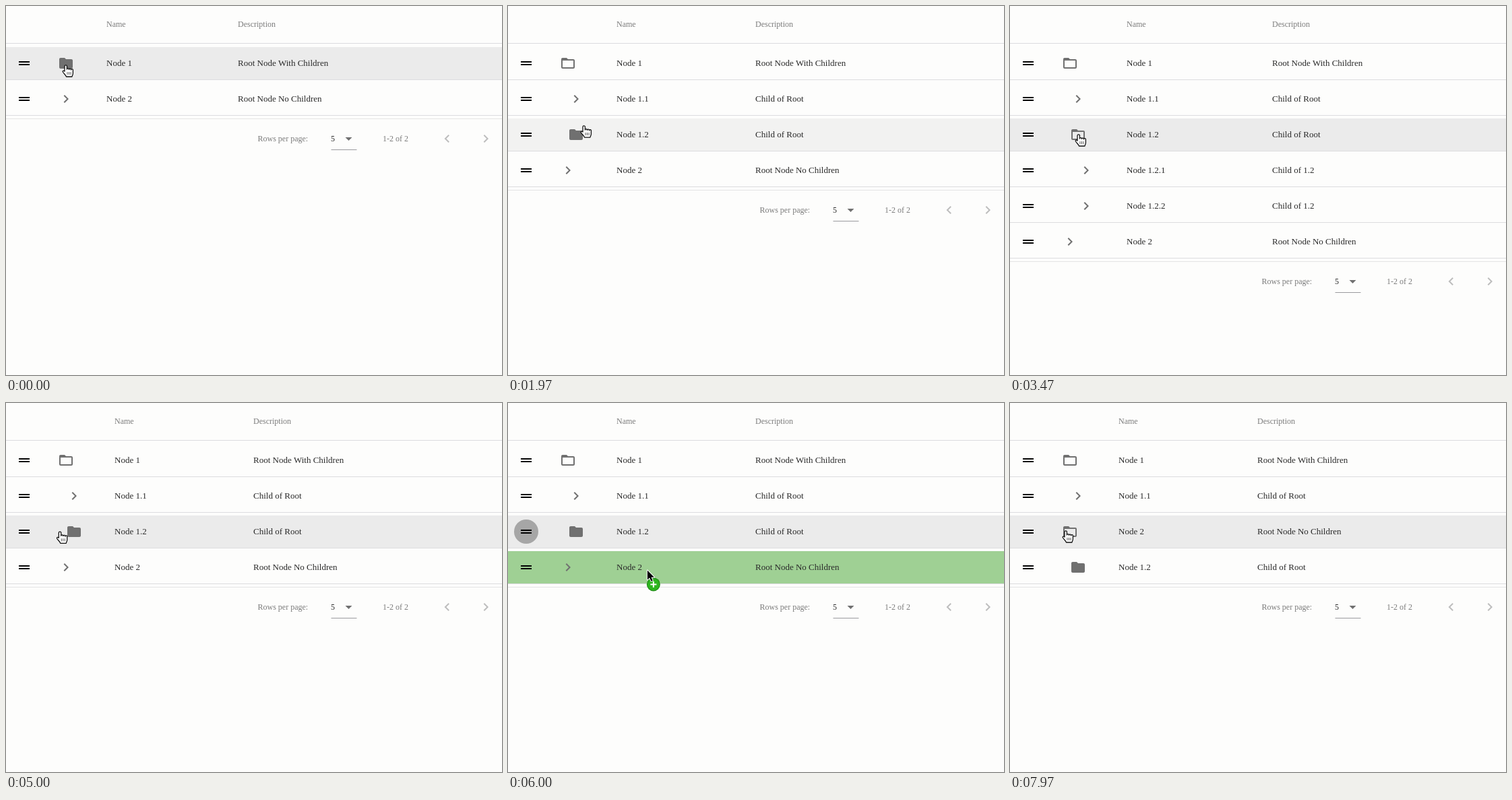
Animation of 736 by 548 pixels, one loop 8 s. Source, as an HTML page with a canvas:

```html
<!DOCTYPE html>
<html lang="en">
<head>
<meta charset="utf-8">
<title>Tree table</title>
<style>
html, body { margin: 0; width: 736px; height: 548px; overflow: hidden; background: #fdfdfc; }
canvas { display: block; }
</style>
</head>
<body>
<canvas id="stage" width="736" height="548"></canvas>
<script>
const ctx = document.getElementById('stage').getContext('2d');
const LOOP = 8000, ROW = 53, FIRST = 85;
const SERIF = '"Liberation Serif", serif';
const DRAG_START = 5570, DROP = 6400, FADE = 150;
const PAPER = '#fdfdfc', INK = '#2a2a2a', MUTED = '#7c7c7c', ICON = '#707070', DISABLED = '#bdbdbd';
const LINE = '#dcdcdf', HOVER = '#ebebeb', TARGET = '#9fd094';

const icons = {
  leaf: new Path2D('M10 6L8.59 7.41 13.17 12l-4.58 4.59L10 18l6-6z'),
  back: new Path2D('M15.41 7.41L14 6l-6 6 6 6 1.41-1.41L10.83 12z'),
  closed: new Path2D('M10 4H4c-1.1 0-2 .9-2 2v12c0 1.1.9 2 2 2h16c1.1 0 2-.9 2-2V8c0-1.1-.9-2-2-2h-8z'),
  open: new Path2D('M20 6h-8l-2-2H4c-1.1 0-2 .9-2 2v12c0 1.1.9 2 2 2h16c1.1 0 2-.9 2-2V8c0-1.1-.9-2-2-2zm0 12H4V8h16z'),
  handle: new Path2D('M20 9H4v2h16zM4 15h16v-2H4z'),
  down: new Path2D('M7 10l5 5 5-5z')
};
const hand = new Path2D('M-2 9V1.5a1.7 1.7 0 0 1 3.4 0V6a1.5 1.5 0 0 1 3 .3 1.5 1.5 0 0 1 3 .6 1.5 1.5 0 0 1 3 .6V12c0 2-1 3-1.5 5H.5C0 15-3 12.5-4.6 10c-.9-1.6 1-2.8 2.6-1z');
const arrow = new Path2D('M0 0V14l3.3-3 2.3 5.2 2.3-1-2.3-5H10z');

const node = (label, about, depth, icon) => ({ label, about, depth, icon });
const root1 = icon => node('Node 1', 'Root Node With Children', 0, icon);
const root2 = icon => node('Node 2', 'Root Node No Children', 0, icon);
const child1 = node('Node 1.1', 'Child of Root', 1, 'leaf');
const child2 = icon => node('Node 1.2', 'Child of Root', 1, icon);
const grandchild = n => node('Node 1.2.' + n, 'Child of 1.2', 2, 'leaf');

const oneOpen = [root1('open'), child1, child2('closed'), root2('leaf')];
const layouts = [
  [0, [root1('closed'), root2('leaf')]],
  [300, oneOpen],
  [2630, [root1('open'), child1, child2('open'), grandchild(1), grandchild(2), root2('leaf')]],
  [4700, oneOpen],
  [DROP, [root1('open'), child1, root2('closed')]],
  [7730, [root1('open'), child1, root2('open'), child2('closed')]]
];
const rowsAt = t => layouts.filter(l => l[0] <= t).pop()[1];

// Pointer keys: time, x, y
const keys = [
  [0, 89, 88], [900, 89, 88], [1070, 90, 86], [1600, 90, 86],
  [1970, 113, 178], [2400, 102, 188], [3370, 102, 188], [3470, 102, 191], [4800, 102, 191],
  [5370, 26, 192], [5570, 26, 192], [5770, 180, 250],
  [6400, 230, 244], [6700, 236, 243], [6830, 237, 243], [6970, 237, 243], [7570, 83, 190], [8000, 83, 190]
];

function slope(i, axis) {
  if (i < 1 || i > keys.length - 2) return 0;
  const rate = j => (keys[j + 1][axis] - keys[j][axis]) / (keys[j + 1][0] - keys[j][0]);
  const a = rate(i - 1), b = rate(i);
  return a * b > 0 ? 2 * a * b / (a + b) : 0;
}

// Monotone cubic through the keys
function pointer(t) {
  const i = Math.max(0, keys.findIndex(k => k[0] > t) - 1);
  const [a, b] = [keys[i], keys[i + 1]], span = b[0] - a[0];
  const u = Math.max(0, (t - a[0]) / span), v = 1 - u;
  return [1, 2].map(axis =>
    a[axis] * v * v * (1 + 2 * u) + b[axis] * u * u * (3 - 2 * u) +
    span * u * v * (v * slope(i, axis) - u * slope(i + 1, axis)));
}

const rowUnder = y => Math.floor((y - 57) / ROW);
const dragging = t => t >= DRAG_START && t < DROP;

// Fades in while the pointer stays over a row, ends at once when it leaves
function hoverAmount(row, t) {
  let stay = 0;
  while (stay < FADE) {
    const s = Math.max(0, t - stay);
    if ((dragging(s) ? 2 : rowUnder(pointer(s)[1])) !== row) break;
    stay += 10;
  }
  return stay / FADE;
}

function rect(x, y, w, h, color) {
  ctx.fillStyle = color;
  ctx.fillRect(x, y, w, h);
}

function disc(x, y, r, color) {
  ctx.fillStyle = color;
  ctx.beginPath();
  ctx.arc(x, y, r, 0, 7);
  ctx.fill();
}

function text(str, x, y, size, color) {
  ctx.font = size + 'px ' + SERIF;
  ctx.fillStyle = color;
  ctx.fillText(str, x, y);
}

function icon(name, x, y, color) {
  ctx.save();
  ctx.translate(x - 12, y - 12);
  ctx.fillStyle = color;
  ctx.fill(icons[name], 'evenodd');
  ctx.restore();
}

function drawRow(row, i, t, nameX, aboutX) {
  const y = FIRST + i * ROW;
  const target = dragging(t) && i === 3 && rowUnder(pointer(t)[1]) === 3;
  ctx.globalAlpha = target ? 1 : hoverAmount(i, t);
  rect(0, y - 24, 736, 48, target ? TARGET : HOVER);
  ctx.globalAlpha = 1;
  rect(0, y + 24, 736, 1, LINE);
  if (i === 2 && dragging(t)) disc(27, y, 18 * Math.min(1, (t - DRAG_START) / FADE), '#a6a6a6');
  icon('handle', 27, y, '#000');
  icon(row.icon, 89 + 12 * row.depth, y, ICON);
  text(row.label, nameX, y + 4, 13, INK);
  text(row.about, aboutX, y + 4, 13, INK);
}

function drawFooter(y) {
  rect(0, y, 736, 1, '#e4e4e4');
  text('Rows per page:', 373.5, y + 34, 12, MUTED);
  text('5', 482, y + 34, 12, INK);
  icon('down', 508.5, y + 30, ICON);
  rect(482.5, y + 46, 38, 1, '#9a9a9e');
  text('1-2 of 2', 559, y + 34, 12, MUTED);
  icon('back', 654.5, y + 30, DISABLED);
  icon('leaf', 712, y + 30, DISABLED);
}

function drawPointer(t, rows) {
  const [x, y] = pointer(t), i = rowUnder(y), row = rows[i], drag = dragging(t);
  const near = cx => Math.hypot(x - cx, y - FIRST - i * ROW) < 21;
  const useHand = !drag && row && (near(27) || near(89 + 12 * row.depth));
  const shape = useHand ? hand : arrow;
  ctx.save();
  ctx.translate(x, y);
  ctx.lineJoin = 'round';
  if (drag) {
    disc(9, 21, 10, '#208c16');
    disc(9, 21, 8.8, '#2db51f');
    rect(4.5, 20, 9, 2, '#fff');
    rect(8, 16.5, 2, 9, '#fff');
  }
  ctx.fillStyle = useHand ? '#fff' : '#000';
  ctx.strokeStyle = useHand ? '#111' : '#fff';
  ctx.lineWidth = useHand ? 1.3 : 2;
  if (useHand) {
    ctx.fill(shape);
    ctx.stroke(shape);
    for (const gap of [2, 4.5, 7]) rect(gap - .5, 10, 1, 4, '#555');
  } else {
    ctx.stroke(shape);
    ctx.fill(shape);
  }
  ctx.restore();
}

function draw(t) {
  const rows = rowsAt(t), depth = Math.max(...rows.map(r => r.depth));
  const nameX = 149 + 12 * depth, aboutX = [344, 367, 389][depth];
  rect(0, 0, 736, 548, PAPER);
  text('Name', nameX, 31, 12, MUTED);
  text('Description', aboutX, 31, 12, MUTED);
  rect(0, 55, 736, 1, LINE);
  rows.forEach((row, i) => drawRow(row, i, t, nameX, aboutX));
  drawFooter(61 + rows.length * ROW);
  drawPointer(t, rows);
}

const start = performance.now();
function tick() {
  draw((performance.now() - start) % LOOP);
  requestAnimationFrame(tick);
}
tick();
</script>
</body>
</html>
```
